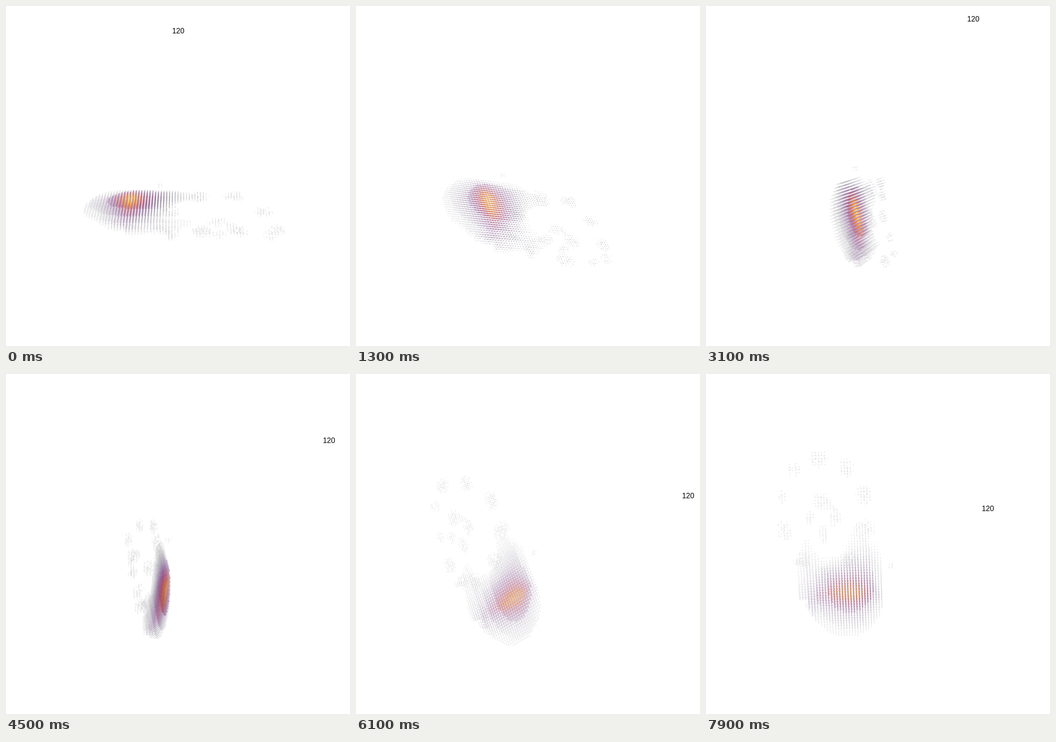
Write an HTML page with a canvas that moves like this. It is 753 by 744 pixels and loops after 8000 ms.

```html
<!DOCTYPE html>
<html lang="en">
<head>
<meta charset="utf-8">
<title>Rotating voxel activity</title>
<style>
  html, body { margin: 0; width: 100%; height: 100%; overflow: hidden; background: #fff; }
  canvas { display: block; position: absolute; left: 0; top: 0; }
  #label {
    position: absolute; left: 0; top: 0; width: 60px; margin: -8px 0 0 -30px;
    font: 16px/20px "Liberation Sans", Arial, sans-serif; text-align: center; color: #000;
  }
</style>
</head>
<body>
<canvas id="view" width="753" height="744"></canvas>
<div id="label">120</div>
<script>
// Object axes: a runs across, d into the depth, w downwards.
const W = 753, H = 744, CX = 376.5, CY = 372;
const LOOP = 8000, STEP = 100, TURN = 12000;
const CAMERA = 1500, GRID = 6.1, TILT = 20 * Math.PI / 180;
const LEVELS = 40, MIN = 0.035;
const STOPS = [[0, 0, 4], [85, 15, 109], [186, 54, 85], [249, 140, 10], [252, 255, 164]];

const sq = x => x * x;
const bell = (x, mid, width) => Math.exp(-sq((x - mid) / width));

function hash(i, j, k) {
  const s = Math.sin(i * 12.9898 + j * 78.233 + k * 37.719) * 43758.5453;
  return s - Math.floor(s);
}

function paint(v) {
  const p = Math.min(v, 0.999) * (STOPS.length - 1), i = Math.floor(p), f = p - i;
  const rgb = STOPS[i].map((c, n) => Math.round(c + (STOPS[i + 1][n] - c) * f));
  return `rgba(${rgb},${(0.02 + v * 0.82).toFixed(3)})`;
}

const palette = Array.from({ length: LEVELS + 1 }, (_, i) => paint(i / LEVELS));

// Height of the upper surface of the volume
function surface(a, d) {
  const u = a + 90, v = d + 70;
  return 27 + sq(u) * (u < 0 ? 0.001 : 0.0001) + sq(v) * (v < 0 ? 0.002 : 0.001);
}

function inside(a, d) {
  if (a < -105) return sq((d + 72) / 84) + sq((a + 105) / 95) < 1;
  return d < 7 && d > -172;
}

function activity(a, d, w) {
  const depth = w - surface(a, d);
  if (depth < 0 || !inside(a, d)) return 0;
  const da = a + 101;
  const fall = (Math.hypot(da, 8) - 8) / (da < 0 ? 32 : 41);
  const core = 0.95 * Math.exp(-fall) * bell(d, -58, d < -58 ? 76 : 46);
  const arms = 0.07 * bell(d, -150, 17) * bell(a, -20, 55)
             + 0.07 * bell(d, -15, 24) * bell(a, -40, 48);
  const hole = 1 - 0.96 * bell(d, -98, 42) * bell(a, 6, 38);
  return (core + arms) * hole * bell(depth, 0, 18);
}

// Faint islands lie on two rings over an arched floor
function island(n, count, reach) {
  const turn = n / count * 2 * Math.PI;
  const d = -110 + 90 * reach * Math.sin(turn);
  return {
    a: 85 + 122 * reach * Math.cos(turn), d,
    w: 35 + 45 * Math.max(0, Math.sin(Math.PI * (-20 - d) / 190)),
    ra: 14 + 14 * hash(n, count, 1), rd: 11 + 11 * hash(n, count, 2)
  };
}

const ring = (count, reach) => Array.from({ length: count }, (_, n) => island(n, count, reach));
const islands = [
  ...ring(10, 1), ...ring(4, 0.3),
  { a: -122, d: -148, w: 52, ra: 24, rd: 14 },
  { a: -40, d: 29, w: 33, ra: 8, rd: 9 }
];

function specks(a, d, w) {
  return islands.reduce((v, s) =>
    v + 0.08 * bell(a, s.a, s.ra) * bell(d, s.d, s.rd) * bell(w, s.w, 11), 0);
}

function tilt(a, d, w) {
  const c = Math.cos(TILT), s = Math.sin(TILT);
  return [a, c * w - s * d, c * d + s * w];
}

function build() {
  const points = [];
  for (let i = -35; i <= 40; i++) {
    for (let j = -38; j <= 7; j++) {
      for (let k = 2; k <= 18; k++) {
        const a = i * GRID, d = j * GRID, w = k * GRID;
        const v = activity(a, d, w) + (hash(i, j, k) > 0.3 ? specks(a, d, w) : 0);
        if (v < MIN) continue;
        points.push({
          pos: tilt(a, d, w),
          level: Math.round(Math.min(v, 1) * LEVELS),
          size: 1.35 + Math.min(0.3, v)
        });
      }
    }
  }
  return points;
}

const AXIS = tilt(1, 1, -1).map(x => x / Math.sqrt(3));
const LABEL = [0, -354, 162];

function rotation(angle) {
  const [x, y, z] = AXIS, c = Math.cos(angle), s = Math.sin(angle), t = 1 - c;
  return [
    [c + t * x * x, t * x * y - s * z, t * x * z + s * y],
    [t * x * y + s * z, c + t * y * y, t * y * z - s * x],
    [t * x * z - s * y, t * y * z + s * x, c + t * z * z]
  ];
}

function project(m, p) {
  const [x, y, z] = m.map(r => r[0] * p[0] + r[1] * p[1] + r[2] * p[2]);
  const f = 1 / (1 + z / CAMERA);
  return { x: CX + x * f, y: CY + y * f, z, f };
}

const ctx = document.getElementById("view").getContext("2d");
const label = document.getElementById("label");
const points = build();
let shown = -1;

function draw(step) {
  const m = rotation(step * STEP / TURN * 2 * Math.PI);
  const dots = points.map(p => ({ ...project(m, p.pos), level: p.level, size: p.size }));
  dots.sort((p, q) => q.z - p.z);
  ctx.clearRect(0, 0, W, H);
  for (const p of dots) {
    ctx.fillStyle = palette[p.level];
    ctx.beginPath();
    ctx.arc(p.x, p.y, p.size * p.f, 0, 7);
    ctx.fill();
  }
  const at = project(m, LABEL);
  label.style.transform = `translate(${Math.round(at.x)}px, ${Math.round(at.y)}px)`;
}

function tick() {
  const step = Math.floor(performance.now() % LOOP / STEP);
  if (step !== shown) draw(shown = step);
  requestAnimationFrame(tick);
}
tick();
</script>
</body>
</html>
```
